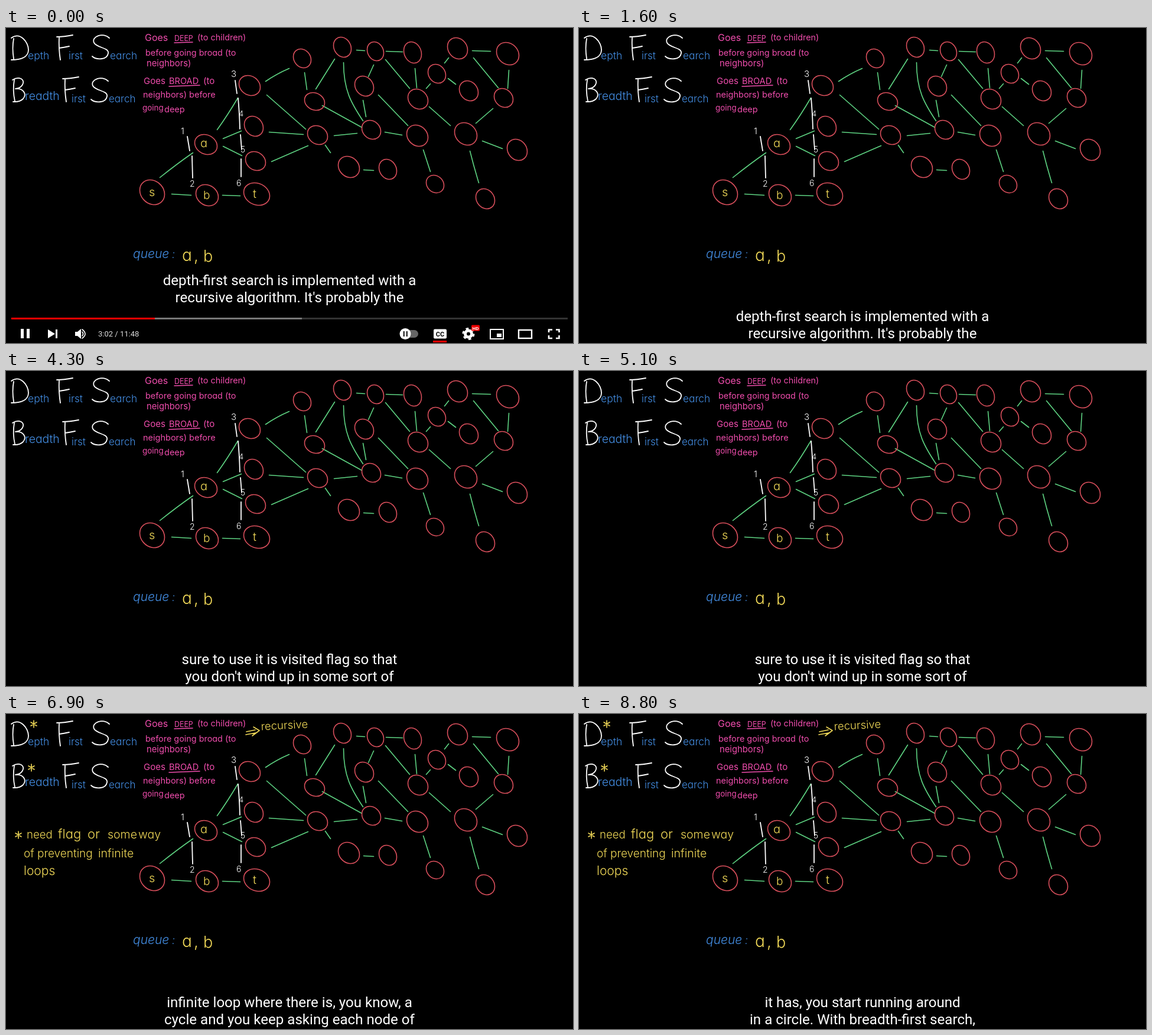
These frames come from a looping animation (960x534 px, 8.9 s). An HTML page:

```html
<!DOCTYPE html>
<html lang="en">
<head>
<meta charset="utf-8">
<title>Depth First Search and Breadth First Search</title>
<style>
  html, body { margin: 0; width: 100%; height: 100%; overflow: hidden; background: #000; }
  svg { display: block; width: 960px; height: 534px; }
  .hand { font-family: Inter, Lato, sans-serif; font-weight: 350; font-feature-settings: "cv11"; }
  .ink { fill: none; stroke-width: 1.6; stroke-linecap: round; stroke-linejoin: round; }
  .node { vector-effect: non-scaling-stroke; }
  .ui { font-family: Roboto, sans-serif; }
  #caption { font-size: 24.1px; fill: #fff; text-anchor: middle; }
</style>
</head>
<body>
<svg viewBox="0 0 960 534" aria-label="Graph search lesson">
  <rect width="960" height="534"/>
  <g id="graph" transform="translate(.5 .5)"></g>

  <g class="ink" stroke="#fff" style="stroke-width:1.8">
    <path d="M307 184L311 208M315 217L316 254M388 89L391 111M393 119Q395 140 396 171M397 181L399 206M398 222V252"/>
    <path aria-label="D" d="M13 18Q10 34 13 52M9 17C24 6 38 24 38 37C38 50 24 54 9 54"/>
    <path aria-label="B" d="M14 88Q11 106 15 124M11 88C22 81 33 87 28 96Q25 102 16 103C31 102 35 113 29 120Q23 126 12 125"/>
    <path id="bigF" aria-label="F" d="M90 15Q89 35 92 54M86 15Q98 15 113 12M90 34Q98 33 107 31"/>
    <path id="bigS" aria-label="S" d="M175 17C165 7 144 14 149 25C154 34 175 33 173 43C171 55 152 54 146 48"/>
    <use href="#bigF" x="10" y="71"/>
    <use href="#bigS" x="-2" y="73"/>
  </g>
  <g id="words" class="hand"></g>
  <path class="ink" stroke="#f04dad" d="M285 25L316 24M276 99L328 97"/>

  <g id="notes">
    <g id="noteWords" class="hand"></g>
    <g id="stars" class="ink" stroke="#f2da58"></g>
    <path class="ink" stroke="#f2da58" d="M407 30L422 27M406 35L423 32M419 22L429 28L417 37"/>
    <text class="hand" fill="#f2da58" font-size="18.5" transform="translate(432 27.5) rotate(-3)">recursive</text>
  </g>

  <g id="player" class="ui" fill="#fff">
    <path fill="#333" d="M9 491H951V494H9z"/>
    <path fill="#777" d="M9 491H501V494H9z"/>
    <path fill="#f00" d="M9 491H252V494H9z"/>
    <path d="M25 510h5v16h-5zM35 510h5v16h-5zM71 511L83 518.5L71 526zM84 511h3v15h-3z"/>
    <path d="M117 515h4l6 -5v17l-6 -5h-4z"/>
    <path class="ink" stroke="#fff" d="M129 515Q132 518.5 129 522M129 511Q139 518.5 129 526"/>
    <text x="156" y="522.5" font-size="13" fill="#ddd">3:02 / 11:48</text>
    <rect x="668" y="512" width="30" height="13" rx="6.5" fill="#666"/>
    <circle cx="676" cy="518.5" r="9.5"/>
    <path fill="#333" d="M672.5 514h2.5v9h-2.5zM677.5 514h2.5v9h-2.5z"/>
    <rect x="724" y="510.5" width="22" height="16" rx="2"/>
    <text x="735" y="522.5" font-size="11" font-weight="700" fill="#000" text-anchor="middle">CC</text>
    <path fill="#f00" d="M723 530h23v3h-23z"/>
    <circle cx="783" cy="518.5" r="5.5" fill="none" stroke="#fff" stroke-width="5"/>
    <circle cx="783" cy="518.5" r="9" fill="none" stroke="#fff" stroke-width="3" stroke-dasharray="4.7 4.72"/>
    <rect x="788" y="503.5" width="14" height="10" rx="1.5" fill="#e00"/>
    <text x="795" y="511.5" font-size="8" font-weight="700" text-anchor="middle">HD</text>
    <g fill="none" stroke="#fff" stroke-width="2">
      <rect x="820" y="511" width="22" height="16"/>
      <rect x="868" y="512" width="22" height="14" stroke-width="2.4"/>
      <path stroke-width="2.6" d="M919 516V511.5H925M931 511.5H936.5V516M936.5 521V526H931M925 526H919V521"/>
    </g>
    <path d="M831 518h8v6h-8z"/>
  </g>

  <g id="caption" class="ui"><text x="480" y="497"></text><text x="480" y="525.5"></text></g>
</svg>

<script>
const LOOP = 8900;
const YELLOW = "#f2da58";
const $ = id => document.getElementById(id);

function add(parent, tag, attrs, text) {
  const el = document.createElementNS("http://www.w3.org/2000/svg", tag);
  for (const key in attrs) el.setAttribute(key, attrs[key]);
  if (text) el.textContent = text;
  return parent.appendChild(el);
}

const edges =
  "M260 253Q290 229 316 211M280 281L313 283M366 283L396 284M357 172Q375 147 392 118M367 187L398 174M367 200L399 216" +
  "M439 90Q458 77 479 68M441 113L507 171M445 176L503 180M449 226L511 199M505 75L509 104M524 103L556 52" +
  "M535 131L602 168M555 182L594 178M540 198L549 211M571 58C571 105 584 127 604 157M604 122L609 150M613 82L622 62" +
  "M593 37L607 38M643 39L671 40M642 53L683 102";
const moreEdges =
  "M692 68L695 101M630 113L680 165M641 176L670 181M711 102L718 94M742 59L749 50M748 85L761 95M716 133L752 165" +
  "M789 38L820 39M791 50L833 101M851 71L849 102M795 161L824 136M806 191L840 204M785 208Q792 236 800 262" +
  "M706 206L718 243M605 240L622 241";
for (const d of [edges, moreEdges]) add($("graph"), "path", { class: "ink", stroke: "#5ed382", d });

const nodes = [
  [247, 278, 21, 21], [338, 197, 19, 17], [340, 283, 19, 18], [424, 281, 22, 19],
  [412, 97, 18, 17], [419, 166, 16, 17], [422, 225, 17, 16], [501, 51, 15, 16],
  [522, 124, 17, 15], [527, 181, 17, 16], [569, 32, 15, 17], [625, 39, 14, 16],
  [688, 41, 15, 18], [606, 98, 16, 17], [618, 172, 16, 16], [697, 120, 17, 17],
  [696, 182, 18, 18], [764, 34, 17, 18], [849, 43, 19, 19], [729, 77, 15, 16],
  [783, 106, 16, 17], [842, 118, 16, 16], [778, 179, 19, 19], [865, 206, 17, 18],
  [580, 235, 18, 18], [646, 239, 15, 17], [726, 264, 15, 15], [811, 289, 16, 17]
];
// Hand-drawn rings lean slightly to the lower right.
const LEAN = 0.17;
for (const [x, y, rx, ry] of nodes)
  add($("graph"), "circle", {
    class: "ink node", stroke: "#d94f5c", r: 1,
    transform: `matrix(${rx} ${ry * Math.sin(LEAN)} 0 ${ry * Math.cos(LEAN)} ${x} ${y})`
  });

// Each word: text, x, baseline, font size
function write(parent, style, words) {
  const group = add(parent, "g", style);
  for (const [text, x, y, size] of words) add(group, "text", { x, y, "font-size": size }, text);
}
write($("words"), { fill: "#448fe6" }, [
  ["epth", 37, 53, 17.5], ["irst", 106, 53, 17], ["earch", 176, 53, 17.3],
  ["readth", 32, 122, 19.4], ["irst", 111, 126, 17], ["earch", 174, 126, 17]
]);
write($("words"), { fill: "#448fe6", "font-style": "italic" }, [["queue", 215, 390, 21], [":", 281, 390, 18]]);
write($("words"), { fill: "#f04dad", "font-weight": 400 }, [
  ["Goes", 235, 22, 16], ["DEEP", 285, 22, 12.4], ["(to children)", 324, 21, 14.4],
  ["before going broad (to", 236, 47, 14.4], ["neighbors)", 238, 65, 14.8],
  ["Goes", 233, 95, 15], ["BROAD", 276, 95, 14.6], ["(to", 334, 95, 15],
  ["neighbors) before", 232, 118, 14.5], ["going", 231, 140, 13.4], ["deep", 268, 143, 14.5]
]);
write($("words"), { fill: YELLOW }, [
  ["s", 242, 285, 20], ["a", 329, 202, 20], ["b", 334, 290, 19], ["t", 418, 288, 20],
  ["a", 298, 395, 28], [",", 318, 395, 28], ["b", 334, 396, 27]
]);
write($("words"), { fill: "#fff" }, [
  ["1", 296, 180, 15], ["2", 311, 269, 14], ["3", 381, 83, 15],
  ["4", 394, 150, 13], ["5", 397, 211, 14], ["6", 390, 268, 14]
]);
write($("noteWords"), { fill: YELLOW }, [
  ["need", 35, 211, 18.6], ["flag", 88, 211, 22], ["or", 138, 211, 22], ["some", 172, 211, 19.5],
  ["way", 224, 211, 19.5], ["of", 30, 243, 19], ["preventing", 53, 243, 19],
  ["infinite", 156, 243, 19.5], ["loops", 30, 273, 21]
]);
for (const [x, y] of [[47, 17], [43, 91], [21, 205]])
  add($("stars"), "path", { d: `M${x} ${y - 6}v12M${x - 5} ${y - 3}l10 6M${x - 5} ${y + 3}l10 -6` });

const captions = [
  [0, "depth-first search is implemented with a", "recursive algorithm. It's probably the"],
  [1900, "simpler algorithm to implement. The only", "little trick is that we have to make"],
  [4200, "sure to use it is visited flag so that", "you don't wind up in some sort of"],
  [6300, "infinite loop where there is, you know, a", "cycle and you keep asking each node of"],
  [8800, "it has, you start running around", "in a circle. With breadth-first search,"]
];
const lines = $("caption").children;
let shown;

function draw(t) {
  const now = captions.filter(c => c[0] <= t).pop();
  if (now !== shown) {
    shown = now;
    lines[0].textContent = now[1];
    lines[1].textContent = now[2];
  }
  $("caption").setAttribute("transform", `translate(0 ${t < 100 ? -61 : 0})`);
  $("player").setAttribute("opacity", Math.max(0, Math.min(1, (200 - t) / 140)));
  $("notes").setAttribute("visibility", t < 6700 ? "hidden" : "visible");
}

const start = performance.now();
function tick() {
  draw((performance.now() - start) % LOOP);
  requestAnimationFrame(tick);
}
tick();
</script>
</body>
</html>
```
